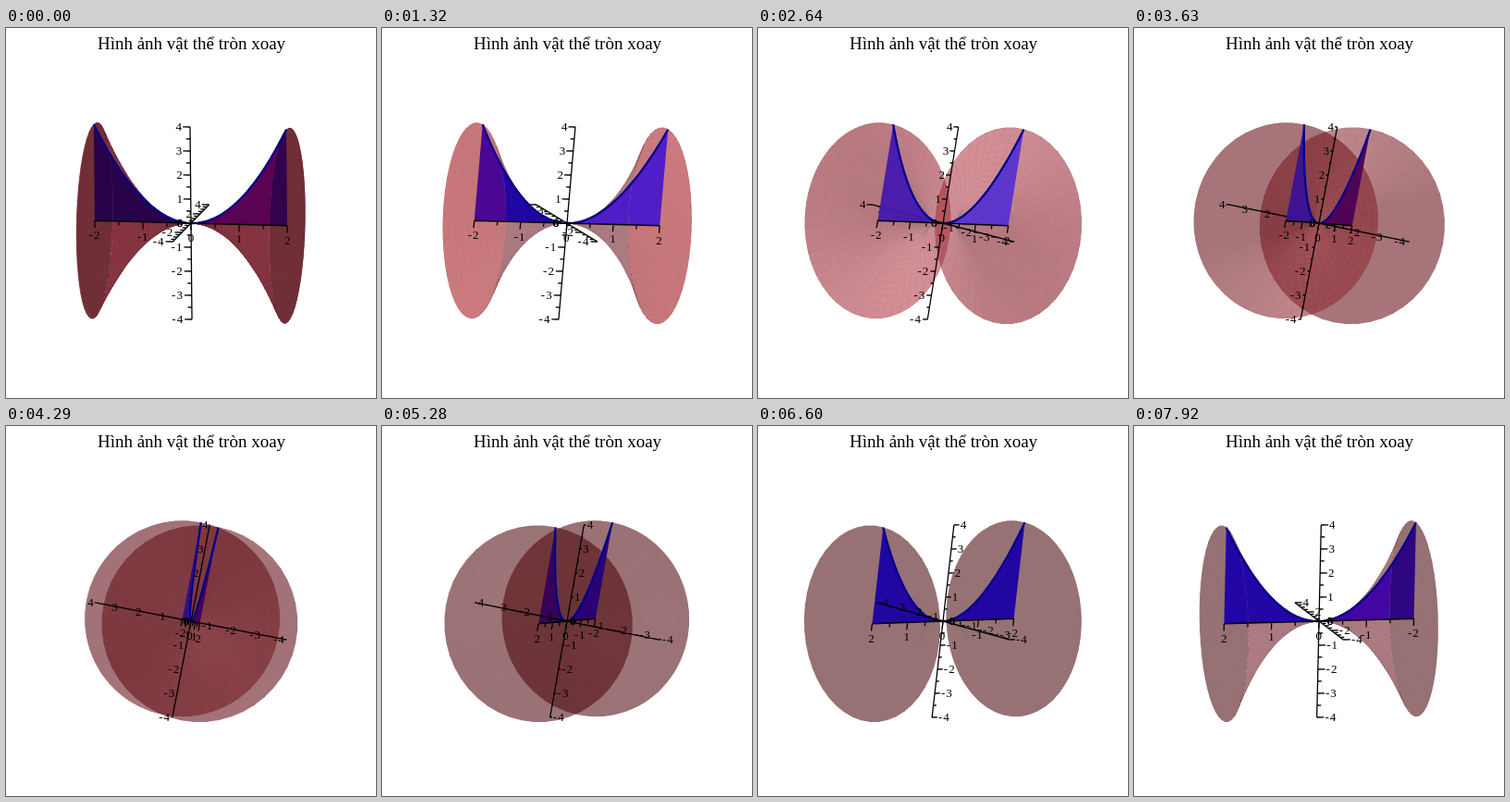
An HTML page with a canvas that plays this animation: 400 px wide and 400 px high, repeating every 8000 ms.

```html
<!DOCTYPE html>
<html lang="vi">
<head>
<meta charset="utf-8">
<title>Hình ảnh vật thể tròn xoay</title>
<style>
  html, body { margin: 0; width: 100%; height: 100%; overflow: hidden; background: #fff; }
  canvas { display: block; width: 400px; height: 400px; }
</style>
</head>
<body>
<canvas id="stage" width="400" height="400"></canvas>
<script>
const SIZE = 400, CX = 200, CY = 211, R = 105.9;
const LOOP = 8000, HOLD = 330, CELLS = 24, SPOKES = 48;
const FONT = '"Liberation Serif", "Times New Roman", serif';
const ctx = document.getElementById('stage').getContext('2d');
const sheet = document.createElement('canvas');
sheet.width = sheet.height = SIZE;
const pen = sheet.getContext('2d');

// The view turns about the screen's vertical, so "up" is fixed in the model.
const UP = [-0.026, 0.189, 0.982];
const E1 = [0.9997, 0.0049, 0.0255], E2 = [0, 0.982, -0.189];
let right, toEye;

// step, surface, sheen, then blue at x<0 (mouth, body) and at x>0 (mouth, body)
const LOOKS = [
  [0, '#52000a', 0, '#23004b', '#23004b', '#30004e', '#580055'],
  [4, '#99080f', 12, '#460096', '#1900a5', '#4b19cd', '#4b19cd'],
  [8, '#80101e', 45, '#4619af', '#4619af', '#5832d0', '#5832d0'],
  [11, '#640812', 50, '#3c1296', '#3c1296', '#4b0055', '#4b0055'],
  [16, '#4d040a', 8, '#260078', '#260078', '#340058', '#340058'],
  [20, '#480308', 0, '#1b00a5', '#1b00a5', '#1b00a5', '#1b00a5'],
  [24, '#460206', 0, '#2a0082', '#3e00a5', '#1c00a8', '#1c00a8']
];

const dot = (a, b) => a[0] * b[0] + a[1] * b[1] + a[2] * b[2];
const cross = (a, b) => [
  a[1] * b[2] - a[2] * b[1], a[2] * b[0] - a[0] * b[2], a[0] * b[1] - a[1] * b[0]];
const project = p => [CX + R * dot(right, p), CY - R * dot(UP, p)];
const rgb = s => [1, 3, 5].map(i => parseInt(s.slice(i, i + 2), 16));
const css = c => `rgb(${c.map(v => Math.max(0, Math.min(255, Math.round(v))))})`;
const mix = (a, b, t) => a.map((v, i) => v + (b[i] - v) * t);

function lookAt(k) {
  const at = k < 2 ? 0 : Math.max(4, k);
  const i = Math.max(0, LOOKS.findIndex(row => row[0] >= at) - 1);
  const a = LOOKS[i], b = LOOKS[i + 1];
  const t = (at - a[0]) / (b[0] - a[0]);
  const tone = n => mix(rgb(a[n]), rgb(b[n]), t);
  return {
    skin: tone(1), sheen: a[2] + (b[2] - a[2]) * t,
    blue: { '-1': [tone(3), tone(4)], '1': [tone(5), tone(6)] }
  };
}

function trace(c, points, close) {
  points.forEach(([x, y], i) => i ? c.lineTo(x, y) : c.moveTo(x, y));
  if (close) c.closePath();
}

const onSkin = (x, a) => project([x, x * x * Math.cos(a), x * x * Math.sin(a)]);
const spoke = j => j * 2 * Math.PI / SPOKES;

function clipMouth(c, side, inside) {
  c.beginPath();
  if (!inside) c.rect(0, 0, SIZE, SIZE);
  trace(c, Array.from({ length: 96 }, (_, j) => onSkin(side, j * Math.PI / 48)), true);
  c.clip('evenodd');
}

function bowlPart(side, inside, color, sheen, alpha) {
  const wantBack = inside && side * toEye[0] > 0;
  const cells = [];
  for (let i = 0; i < CELLS; i++) {
    for (let j = 0; j < SPOKES; j++) {
      const x = side * (i + 0.5) / CELLS, a = spoke(j + 0.5);
      const len = Math.hypot(1, 2 * x);
      let n = [-2 * x / len, Math.cos(a) / len, Math.sin(a) / len];
      const back = dot(n, toEye) < 0;
      if (back !== wantBack) continue;
      if (back) n = n.map(v => -v);
      const glow = sheen * Math.max(0, dot(n, UP) - dot(n, right));
      const x0 = side * i / CELLS, x1 = side * (i + 1) / CELLS;
      cells.push({
        path: [onSkin(x0, spoke(j)), onSkin(x1, spoke(j)),
               onSkin(x1, spoke(j + 1)), onSkin(x0, spoke(j + 1))],
        fill: css([color[0] + glow, color[1] + glow * 0.75, color[2] + glow * 0.75])
      });
    }
  }
  pen.clearRect(0, 0, SIZE, SIZE);
  pen.save();
  clipMouth(pen, side, inside);
  pen.lineWidth = 0.8;
  for (const cell of cells) {
    pen.beginPath();
    trace(pen, cell.path, true);
    pen.fillStyle = pen.strokeStyle = cell.fill;
    pen.fill();
    pen.stroke();
  }
  pen.lineWidth = 0.6;
  pen.strokeStyle = 'rgba(50,0,8,0.32)';
  pen.beginPath();
  for (const cell of cells) trace(pen, cell.path.slice(0, 3));
  pen.stroke();
  pen.restore();
  ctx.globalAlpha = alpha;
  ctx.drawImage(sheet, 0, 0);
  ctx.globalAlpha = 1;
}

function bowl(side, k, look) {
  const alpha = k < 2 ? 0.82 : 0.56;
  const body = k < 2 ? [112, 6, 24] : [112, 20, 32];
  bowlPart(side, false, body, 0, alpha);
  bowlPart(side, true, look.skin, look.sheen, alpha);
}

function blueRegion(side, tones) {
  const arc = Array.from({ length: 41 }, (_, i) => {
    const x = side * i / 40;
    return project([x, 0, x * x]);
  });
  const area = arc.concat([project([side, 0, 0])]);
  [true, false].forEach((inside, i) => {
    ctx.save();
    clipMouth(ctx, side, inside);
    ctx.beginPath();
    trace(ctx, area, true);
    ctx.globalAlpha = 0.95;
    ctx.fillStyle = css(tones[i]);
    ctx.fill();
    ctx.restore();
  });
  ctx.strokeStyle = '#00008c';
  ctx.lineWidth = 2.3;
  ctx.beginPath();
  trace(ctx, arc);
  ctx.stroke();
}

function label(value, x, y, align) {
  const text = String(value);
  ctx.font = '13px ' + FONT;
  ctx.letterSpacing = value < 0 ? '1px' : '0px';
  ctx.textAlign = align;
  ctx.fillStyle = '#000';
  ctx.fillText(text, x, y + 4);
  ctx.letterSpacing = '0px';
}

// Draws the marks from value `from` to `to` along one axis.
function axis(dim, from, to, max, step) {
  const at = v => project([0, 1, 2].map(d => d === dim ? v / max : 0));
  const dir = dim === 0 ? [-right[2], UP[2]] : [-right[0], UP[0]];
  ctx.strokeStyle = '#000';
  ctx.lineWidth = 1.3;
  ctx.beginPath();
  trace(ctx, [at(from), at(to)]);
  for (let v = from; v <= to; v += 0.5) {
    const [x, y] = at(v), size = v % step ? 4.5 : 8;
    trace(ctx, [[x, y], [x + dir[0] * size, y + dir[1] * size]]);
  }
  ctx.stroke();
  for (let v = from; v <= to; v++) {
    if (v % step) continue;
    const [x, y] = at(v), tipX = x + dir[0] * 8;
    if (dim === 0) label(v, tipX, y + 16, 'center');
    else if (dir[0] < 0) label(v, tipX - 1, y, 'right');
    else label(v, tipX + 1, y, 'left');
  }
}

function draw(k) {
  const turn = (10.6 - k * 360 / 49) * Math.PI / 180;
  right = E1.map((v, i) => v * Math.cos(turn) + E2[i] * Math.sin(turn));
  toEye = cross(right, UP);
  const look = lookAt(k);
  const near = toEye[0] > 0 ? 1 : -1;
  const depthStep = Math.abs(right[1]) < 0.4 ? 2 : 1;
  const halves = [[-4, 0], [0, 4]];
  if (toEye[1] < 0) halves.reverse();

  ctx.fillStyle = '#fff';
  ctx.fillRect(0, 0, SIZE, SIZE);
  bowl(-near, k, look);
  bowl(near, k, look);
  axis(1, ...halves[0], 4, depthStep);
  blueRegion(-near, look.blue[-near]);
  blueRegion(near, look.blue[near]);
  axis(0, -2, 2, 2, 1);
  axis(2, -4, 4, 4, 1);
  axis(1, ...halves[1], 4, depthStep);

  ctx.font = '19px ' + FONT;
  ctx.textAlign = 'center';
  ctx.fillStyle = '#000';
  ctx.fillText('Hình ảnh vật thể tròn xoay', 200.5, 23);
}

let shown = -1;
function tick() {
  const k = Math.floor(performance.now() % LOOP / HOLD);
  if (k !== shown) draw(shown = k);
  requestAnimationFrame(tick);
}
tick();
</script>
</body>
</html>
```
